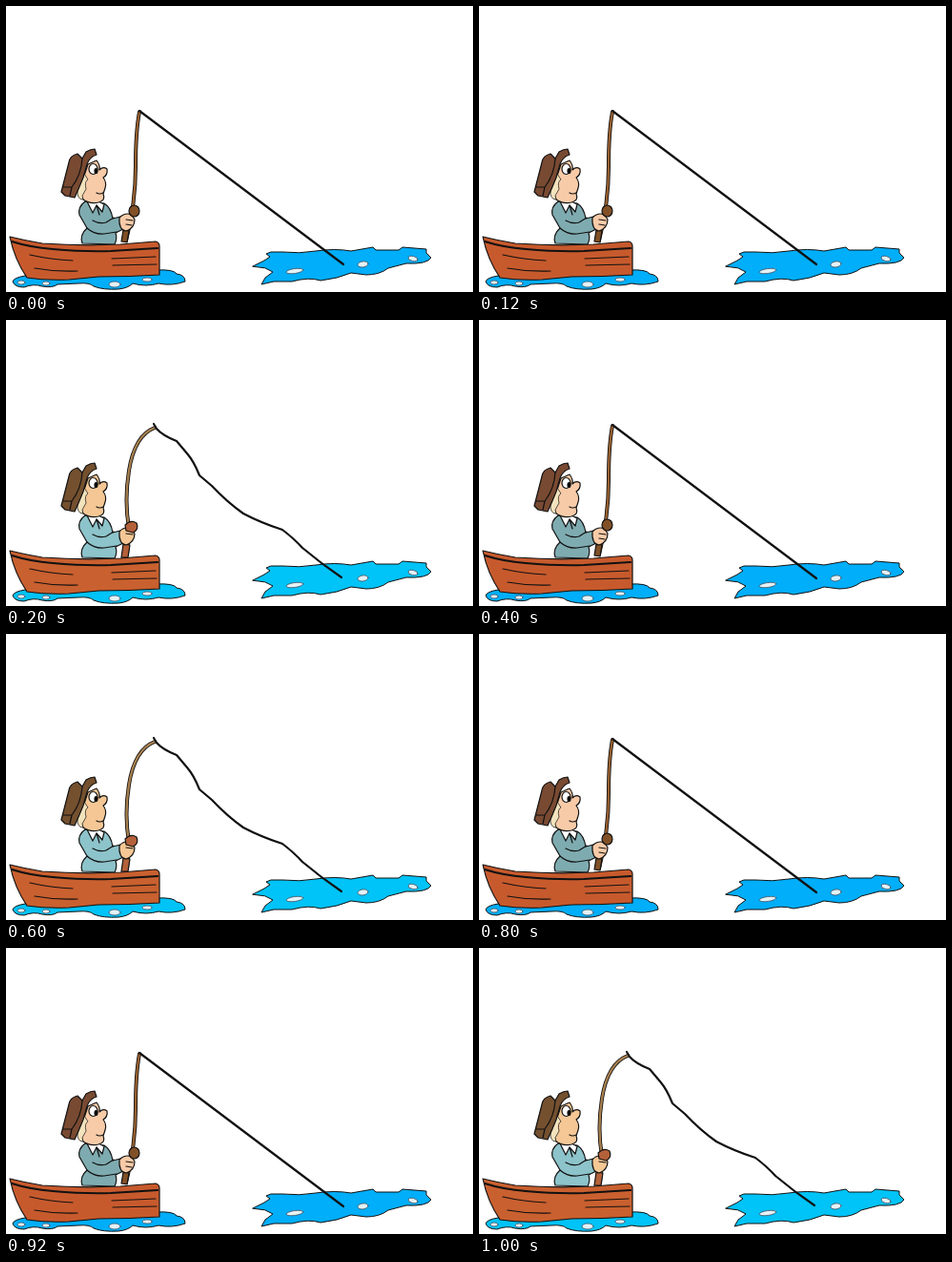
These frames come from a looping animation (490 px wide and 300 px high, 1200 ms). An HTML page:

```html
<!DOCTYPE html>
<html lang="en">
<head>
<meta charset="utf-8">
<title>Fishing</title>
<style>
html, body { margin: 0; width: 100%; height: 100%; overflow: hidden; background: #fff; }
svg { display: block; width: 490px; height: 300px; animation: palette .4s step-end infinite; }
path, ellipse { stroke: #111; stroke-width: 1.2; stroke-linejoin: round; stroke-linecap: round; }
.line { fill: none; }
.thick { stroke-width: 2.2; }
.water { fill: var(--water); stroke-width: 1; }
.foam ellipse { fill: #e4f2f6; stroke: #456; stroke-width: .8; }
.wood { fill: var(--wood); }
.hat { fill: var(--hat); }
.skin { fill: var(--skin); }
.hair { fill: #f3e3bd; stroke-width: .7; }
.coat { fill: var(--coat); }
.white { fill: #fff; }
.rod { fill: none; stroke-width: 4; }
.rod + .rod { stroke: var(--rod); stroke-width: 2.3; }
.reel { fill: var(--reel); }
.taut { animation: show .4s step-end infinite; }
.bent { animation: hide .4s step-end infinite; }
@keyframes show { 0% { visibility: visible; } 50%, 100% { visibility: hidden; } }
@keyframes hide { 0% { visibility: hidden; } 50%, 100% { visibility: visible; } }
@keyframes palette {
  0% {
    --water: #00aefa; --wood: #c75a2d; --hat: #794a32; --skin: #f8cba8;
    --coat: #7eabb0; --rod: #98602f; --reel: #815027;
  }
  50%, 100% {
    --water: #00c3f7; --wood: #c9602f; --hat: #74502f; --skin: #f4c795;
    --coat: #8dc3ca; --rod: #a9814f; --reel: #b3613a;
  }
}
</style>
</head>
<body>
<svg viewBox="0 0 490 300">
  <!-- far pool -->
  <path class="water" d="M259 273 L271 267 L277 263 L273 260 L278 258 L290 258 Q308 260 325 257 Q345 254 362 257 L385 253 L388 256 L412 256 L416 253 L441 255 L441 259 L446 264 Q442 271 420 270 L401 275 Q392 282 378 282 L362 280 Q348 286 330 288 Q318 284 300 289 L281 289 L268 292 L272 285 L280 279 L272 275 Z"/>
  <g class="foam">
    <ellipse cx="303" cy="278" rx="9" ry="2.5" transform="rotate(-8 303 278)"/>
    <ellipse cx="374.5" cy="271" rx="5.5" ry="3" transform="rotate(-8 374 271)"/>
    <ellipse cx="427" cy="265" rx="5" ry="2.5" transform="rotate(12 427 265)"/>
  </g>

  <!-- water round the boat -->
  <path class="water" d="M20 283 Q8 285 7 289 Q9 295 19 295 Q29 291 38 294 Q49 296 54 292 L76 291 Q88 290 92 294 Q102 298 118 297 Q128 296 133 291 Q147 295 160 291 Q174 294 188 289 Q188 282 179 281 Q176 276 158 277 Z"/>
  <g class="foam">
    <ellipse cx="16" cy="290" rx="4" ry="2"/>
    <ellipse cx="42" cy="291" rx="4" ry="2"/>
    <ellipse cx="114" cy="292" rx="6" ry="3"/>
    <ellipse cx="148" cy="287" rx="5" ry="2"/>
  </g>

  <!-- angler -->
  <path class="coat" d="M83 205 Q75 211 77 219 L85 233 Q77 240 80 249 L114 250 Q117 244 115 238 L125 233 L120 221 L112 223 Q110 211 103 207 Z"/>
  <path class="white" d="M84 203 L91 217 L95 209 L101 216 L103 208 L95 204 Z"/>
  <path class="line" d="M91 225 Q98 229 105 227 L113 222 M85 233 Q93 240 103 239 L116 237 M95 209 L98 219"/>
  <path class="skin" d="M80 184 L86 166 L95 162 Q99 167 98 172 Q102 168 106 171 Q107 177 102 180 Q106 185 104 191 L102 197 Q105 204 97 206 Q88 208 81 203 Q76 194 80 184 Z"/>
  <path class="hair" d="M75 193 L82 176 L86 182 Q82 184 84 192 L80 199 L81 203 Q74 203 75 193 Z"/>
  <path class="line" d="M95 196 Q98 198 102 196"/>
  <ellipse class="white" cx="91.500" cy="171" rx="4.500" ry="5.500"/>
  <ellipse cx="94.500" cy="173" rx="1.500" ry="2.500"/>
  <path class="hat" d="M58 195 L66 164 Q67 157 75 155 L80 160 L84 153 Q89 150 93 150 L95 156 Q88 158 85 166 L81 180 Q77 190 72 201 L62 199 Z"/>
  <path class="line" d="M80 160 Q79 177 69 190 L60 190 M69 190 L67 199"/>

  <!-- boat -->
  <path class="wood" d="M4 242 Q20 246 38 249 Q80 252 120 250 L157 247 Q161 248 161 252 L161 282 Q130 284 97 284 L66 287 Q42 288 22 285 Q9 266 4 242 Z"/>
  <path class="line thick" d="M6 247 Q25 253 49 255 Q82 258 110 257 L159 254"/>
  <path class="line" d="M25 261 Q47 266 70 267 M30 275 Q52 279 75 278 M111 265 L157 263 M112 272 L158 271"/>

  <g class="taut">
    <path class="rod" d="M126 246 Q136 207 136 168 Q136 132 140 111"/>
    <path class="rod" d="M126 246 Q136 207 136 168 Q136 132 140 111"/>
    <path class="reel" d="M123 235 L129 236 L127 248 L121 247 Z"/>
    <path class="skin" d="M119 222 Q125 216 132 219 L135 224 Q135 233 126 236 Q118 235 119 222 Z"/>
    <path class="line" d="M126 224 L133 225 M126 229 L132 230"/>
    <ellipse class="reel" cx="134.500" cy="215" rx="5.500" ry="6"/>
    <path class="line thick" d="M140 110 L354 271"/>
  </g>

  <g class="bent">
    <path class="rod" d="M127 246 L129 218 Q124 190 129 158 Q135 121 156 113"/>
    <path class="rod" d="M127 246 L129 218 Q124 190 129 158 Q135 121 156 113"/>
    <path class="reel" d="M123 235 L130 236 L128 249 L121 249 Z"/>
    <path class="skin" d="M119 222 Q124 216 131 219 L135 224 Q135 233 126 236 Q118 235 119 222 Z"/>
    <path class="line" d="M126 224 L133 225"/>
    <path class="reel" d="M125 215 Q131 209 137 213 Q140 220 133 223 L126 221 Z"/>
    <path class="line thick" d="M155 109 L158 114 Q164 121 179 127 L190 140 Q197 148 203 163 L216 174 Q232 191 249 203 Q268 213 290 220 Q303 230 311 239 Q330 255 352 270"/>
  </g>
</svg>
</body>
</html>
```
